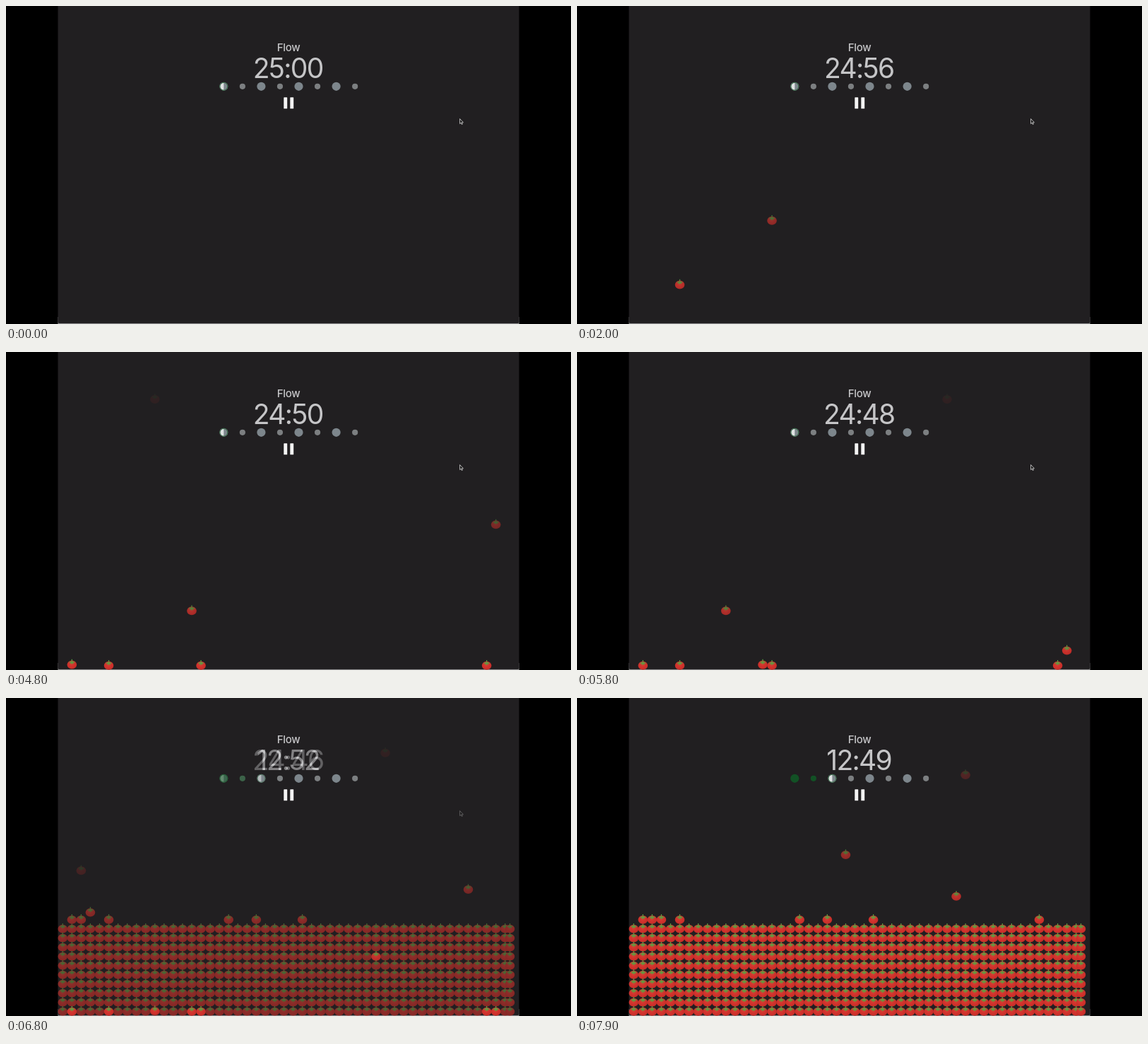
An HTML page for the animation above (8000 ms loop, 800x450 px).

```html
<!DOCTYPE html>
<html lang="en">
<head>
<meta charset="utf-8">
<title>Focus timer</title>
<style>
  html, body { margin: 0; width: 100%; height: 100%; overflow: hidden; background: #000; }
  svg { display: block; width: 100vw; height: 100vh; }
  text { font-family: Inter, Roboto, sans-serif; text-anchor: middle; fill: #c5c5c7; }
  .label { font-size: 15px; font-weight: 500; letter-spacing: -.35px; }
  .clock { font-size: 39px; letter-spacing: -1.7px; }
</style>
</head>
<body>
<svg id="stage" viewBox="0 0 800 450">
  <defs>
    <radialGradient id="skin" cx=".45" cy=".4" r=".65">
      <stop offset="0" stop-color="#dc3a32"/>
      <stop offset="1" stop-color="#c42b27"/>
    </radialGradient>
    <g id="tomato">
      <ellipse cy=".7" rx="6.8" ry="6" fill="url(#skin)"/>
      <path d="M0-7V.2M-3.9-2.5Q0-4.6 3.9-2.5M-2.4-.8L0-3.6L2.4-.8" fill="none" stroke="#629a40" stroke-width="1.3"/>
    </g>
  </defs>
</svg>
<script>
const LOOP = 8000, FALL = 2400, TOP = 32, FLOOR = 443, STEP = 13;
const FADE_START = 6200, FADE_TIME = 1000;
const stage = document.getElementById('stage');

function add(parent, tag, attrs = {}) {
  const el = document.createElementNS('http://www.w3.org/2000/svg', tag);
  for (const key in attrs) el.setAttribute(key, attrs[key]);
  parent.appendChild(el);
  return el;
}

const columnX = col => Math.min(80.3 + 13.05 * col, 713.5);
const place = (el, col, y) => el.setAttribute('transform', `translate(${columnX(col)} ${y})`);

// cubic-bezier(.25, .1, .25, 1)
function ease(x) {
  if (x <= 0) return 0;
  if (x >= 1) return 1;
  const curve = (u, a, b) => 3 * u * (1 - u) ** 2 * a + 3 * u * u * (1 - u) * b + u ** 3;
  let lo = 0, hi = 1;
  for (let i = 0; i < 24; i++) {
    const mid = (lo + hi) / 2;
    if (curve(mid, .25, .25) < x) lo = mid; else hi = mid;
  }
  return curve(lo, .1, 1);
}

function addDots(g, current) {
  for (let i = 0; i < 8; i++) {
    const cx = 308.3 + 26.55 * i, cy = 113.8, big = i % 2 === 0;
    const fill = i < current ? '#125125' : big ? '#7d868c' : '#7c7f81';
    add(g, 'circle', { cx, cy, r: big ? 6.1 : 4.1, fill });
    if (i === current) {
      add(g, 'path', { d: `M${cx} ${cy - 5.2}a5.2 5.2 0 0 0 0 10.4z`, fill: '#dfe2e2' });
      add(g, 'circle', { cx, cy, r: 5.4, fill: 'none', stroke: '#2f6b40', 'stroke-width': 1 });
    }
  }
}

// drops: [column, start time]; rows: full rows already stacked
function makeScene({ current, rows, settled, drops, seconds }) {
  const g = add(stage, 'g');
  add(g, 'rect', { width: 800, height: 450 });
  add(g, 'rect', { x: 73.5, y: 440, width: 653, height: 10, fill: '#8b8b8c' });
  add(g, 'path', { d: 'M73.5 0H726.5V447q0 2-2 2H75.5q-2 0-2-2z', fill: '#211f21' });

  add(g, 'text', { x: 400, y: 64.4, class: 'label' }).textContent = 'Flow';
  const clock = add(g, 'text', { x: 399.2, y: 101.6, class: 'clock' });
  addDots(g, current);
  for (const x of [393.3, 402.3])
    add(g, 'rect', { x, y: 129.3, width: 4.9, height: 16, rx: .6, fill: '#f4f4f4' });

  const tomato = () => add(g, 'use', { href: '#tomato' });
  for (let r = rows - 1; r >= 0; r--)
    for (let c = 0; c < 50; c++) place(tomato(), c, FLOOR - STEP * r);
  const rest = FLOOR - STEP * rows;
  settled.forEach(c => place(tomato(), c, rest));
  const falling = drops.map(([col, start]) => ({ el: tomato(), col, start }));

  const update = t => {
    const s = seconds(t);
    clock.textContent = `${Math.floor(s / 60)}:${String(s % 60).padStart(2, '0')}`;
    for (const { el, col, start } of falling) {
      const k = ease((t - start) / FALL);
      place(el, col, TOP + (rest - TOP) * k);
      el.setAttribute('opacity', k);
    }
  };
  return { g, update };
}

const first = makeScene({
  current: 0, rows: 0, settled: [],
  drops: [[5, 1], [15, 2], [46, 4], [1, 5], [14, 7], [47, 8], [10, 9], [34, 11], [2, 12]]
    .map(([col, beat]) => [col, 78 + 500 * beat]),
  seconds: t => 1500 - Math.floor((t + 422) / 500)
});
add(first.g, 'path', {
  d: 'M642.6 159.6v7l1.6-1.4 1.1 2.4 1.1-.5-1.1-2.3h2.1z',
  fill: '#111', stroke: '#ddd', 'stroke-width': .8
});

const second = makeScene({
  current: 2, rows: 10, settled: [1, 2, 5, 18, 21, 26],
  drops: [[3, 4980], [44, 5478], [35, 6470], [23, 6955], [36, 7445]],
  seconds: t => 772 - Math.max(0, Math.floor((t - 6380) / 500))
});

function draw(t) {
  const mix = Math.min(1, Math.max(0, (t - FADE_START) / FADE_TIME));
  first.update(t);
  second.g.setAttribute('display', mix > 0 ? 'inline' : 'none');
  second.g.setAttribute('opacity', mix);
  if (mix > 0) second.update(t);
}

let origin;
function tick(now) {
  origin ??= now;
  draw((now - origin) % LOOP);
  requestAnimationFrame(tick);
}
draw(0);
requestAnimationFrame(tick);
</script>
</body>
</html>
```
